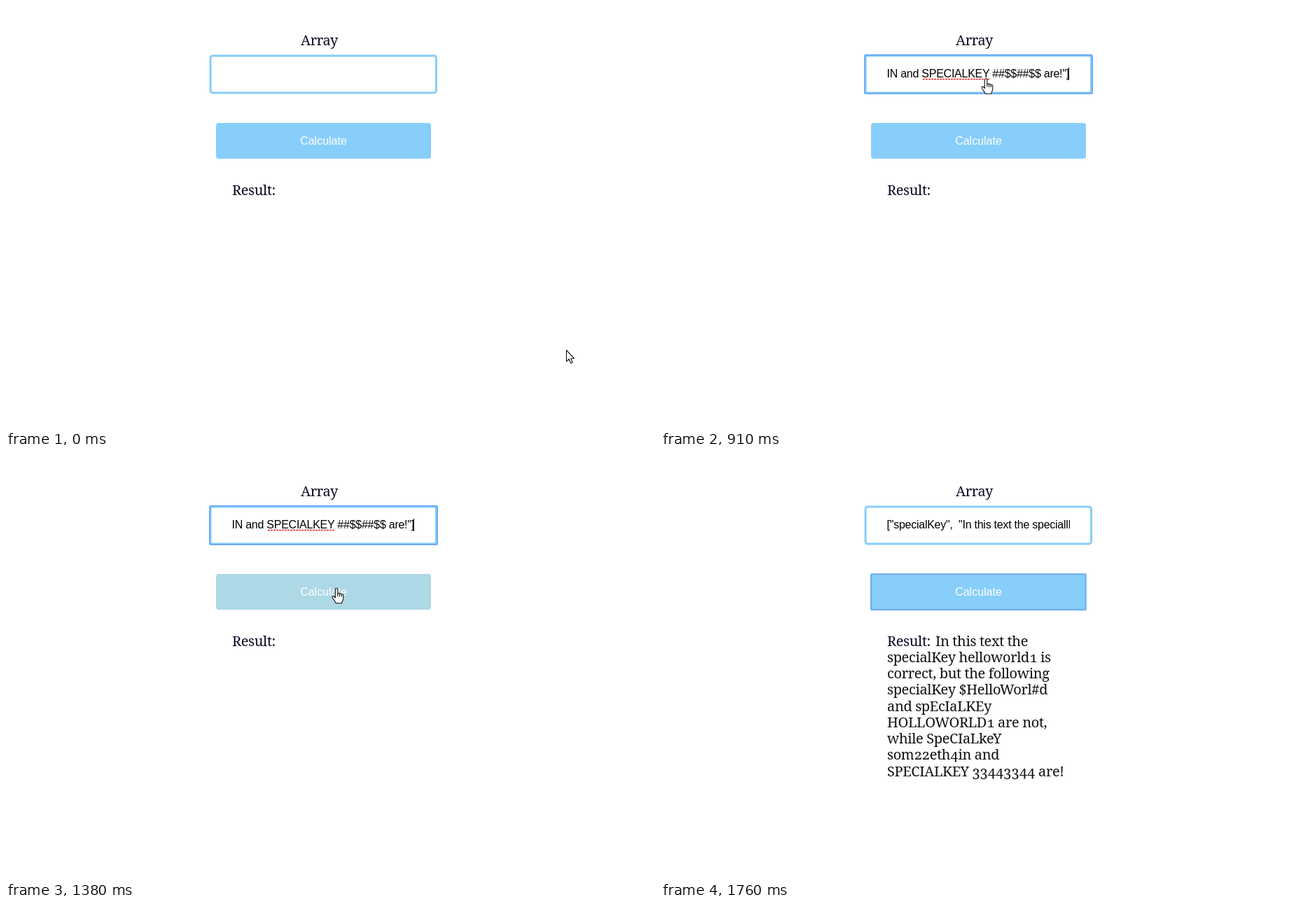
These frames come from a looping animation (927 by 604 pixels, 2390 ms). An HTML page:

```html
<!DOCTYPE html>
<html lang="en">
<head>
<meta charset="utf-8">
<title>Array form</title>
<style>
  html, body { margin: 0; width: 100%; height: 100%; overflow: hidden; background: #fff; }
  svg { display: block; }
  text { white-space: pre; }
  .serif { font: 20px "Noto Serif", serif; letter-spacing: -.36px; font-variant-numeric: oldstyle-nums; fill: #0a0a23; }
  .sans { font: 16px "Liberation Sans", Arial, sans-serif; fill: #000; }
  .field { letter-spacing: -.25px; }
  .ring { fill: none; stroke: #6dabf5; stroke-width: 2; }
  .pointer { fill: #fff; stroke: #111; stroke-width: 1.1; stroke-linejoin: round; }
</style>
</head>
<body>
<svg width="927" height="604" viewBox="0 0 927 604">
  <clipPath id="inner"><rect x="322" y="80" width="262" height="36"/></clipPath>

  <text class="serif" x="421" y="56">Array</text>
  <rect x="292.1" y="71.1" width="322.4" height="52.8" rx="3" fill="#fff" stroke="#87cefa" stroke-width="3"/>
  <rect id="inputRing" class="ring" x="291" y="70" width="325" height="55" rx="1.5"/>
  <g clip-path="url(#inner)" class="sans field">
    <g id="tail">
      <text x="322.5" y="102">IN and SPECIALKEY ##$$##$$ are!"]</text>
      <path d="M374 104.5H469" stroke="#e22" stroke-width="1.5" stroke-dasharray="3 1"/>
    </g>
    <text id="head" x="322.5" y="102">["specialKey",  "In this text the speciallKey</text>
    <path id="caret" d="M582.5 88V106" stroke="#000"/>
  </g>

  <rect id="button" x="300" y="167" width="307" height="51" rx="4"/>
  <rect id="buttonRing" class="ring" x="300" y="167.3" width="306.7" height="51" rx="1"/>
  <text class="sans" x="453.5" y="198" text-anchor="middle" style="fill:#fff">Calculate</text>

  <text class="serif" x="323" y="269.7">Result:</text>
  <g id="result" class="serif" style="fill:#111"></g>

  <circle id="click" r="14" fill="#ff0" fill-opacity=".55"/>
  <path id="arrow" class="pointer" d="M0 0V16.2L3.7 12.7 6.3 18.5 8.8 17.4 6.3 11.7H11Z"/>
  <path id="hand" class="pointer" d="M-1.6 14V2A1.7 1.7 0 0 1 1.8 2V8.5C2 6.8 4.6 7 4.6 8.8C5 7.5 7.3 7.8 7.3 9.5C8 8.5 9.8 9 9.8 10.8V15C9.8 18 8 19 7.6 21.7H-.8C-1.5 19-5.5 15.5-5.8 13.2C-6 11.5-3.8 11-3 12.5ZM1.8 8.5V12M4.6 8.8V12.5M7.3 9.5V12.5"/>
</svg>
<script>
const LOOP = 2390;
const $ = id => document.getElementById(id);
const show = (id, on) => $(id).style.display = on ? '' : 'none';

const lines = [
  'In this text the', 'specialKey helloworld1 is', 'correct, but the following',
  'specialKey $HelloWorl#d', 'and spEcIaLKEy', 'HOLLOWORLD1 are not,',
  'while SpeCIaLkeY', 'som22eth4in and', 'SPECIALKEY 33443344 are!'
];
$('result').innerHTML = lines.map((line, i) =>
  `<text x="${i ? 323 : 392}" y="${269.7 + i * 23.25}">${line}</text>`).join('');

// Stepped pointer positions: start time, x, y
const steps = [
  [0, 800.5, 491.5], [70, 752, 424], [150, 646, 268], [230, 532, 119], [300, 476, 54.5],
  [380, 464, 103.5], [990, 466, 121], [1070, 471, 146], [1140, 473.5, 169.5], [1220, 474, 178],
  [1300, 473, 184], [1380, 472, 187], [1600, 489, 209.5], [1680, 797.5, 541.5]
];

function draw(t) {
  const between = (from, to = LOOP) => t >= from && t < to;
  const [, x, y] = steps.findLast(step => t >= step[0]);
  const inside = (left, top, right, bottom) => x > left && x < right && y > top && y < bottom;
  const hover = inside(300, 167, 607, 218);
  const hand = hover || inside(291, 70, 616, 125);

  show('inputRing', between(450, 1450));
  show('tail', between(540, 1450));
  show('caret', between(910, 1450));
  show('head', between(1450));
  show('buttonRing', between(1450));
  show('result', between(1530));
  show('click', between(450, 540) || between(1450, 1530));
  show('hand', hand);
  show('arrow', !hand && t < 1760);
  $('button').setAttribute('fill', hover ? '#add8e6' : '#87cefa');
  for (const id of ['click', 'arrow', 'hand']) {
    $(id).setAttribute('transform', `translate(${x} ${y})`);
  }
}

function tick() {
  draw(performance.now() % LOOP);
  requestAnimationFrame(tick);
}
tick();
</script>
</body>
</html>
```
